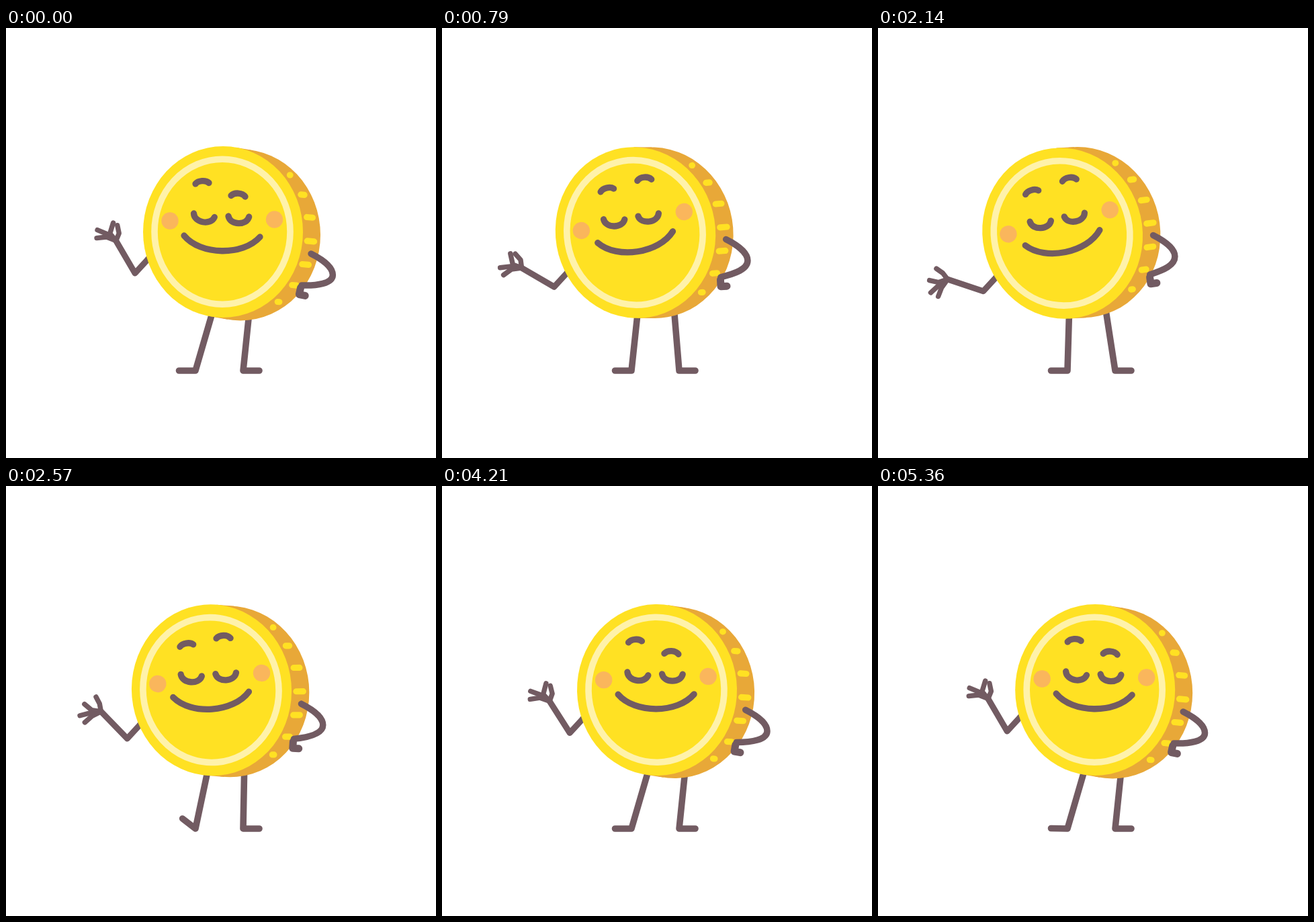
These frames come from a looping animation (640 by 640 pixels, 5430 ms). An HTML page with a canvas:

```html
<!DOCTYPE html>
<html lang="en">
<head>
<meta charset="utf-8">
<title>Coin character</title>
<style>
  html, body { margin: 0; width: 100%; height: 100%; overflow: hidden; background: #fff; }
  canvas { display: block; width: 100%; height: 100%; }
</style>
</head>
<body>
<canvas id="stage" width="640" height="640"></canvas>
<script>
const ctx = document.getElementById('stage').getContext('2d');
const LOOP = 5430, STEP = 1000 / 14;
const INK = '#725b62', GOLD = '#ffe123', RIM = '#e8a838', RING = '#fff2aa', BLUSH = '#fab65c';
const RX = 119, RY = 127.5, RAD = Math.PI / 180;

// Key points of the sway: time, centre x of the coin
const SWAY = [
  [0, 323], [570, 314.5], [790, 288], [1720, 270], [2290, 278],
  [2570, 306], [2860, 313.5], [3290, 318], [4210, 320], [LOOP, 323.2]
];

// Fingers: angle pinched, angle spread, length, bend when pinched
const FINGERS = [[-85, -95, 23, 17], [-99, -142, 27, -31], [-150, -177, 32, 7], [-172, -200, 29, 14]];

const mix = (a, b, t) => a + (b - a) * t;
const polar = (r, deg) => [r * Math.cos(deg * RAD), r * Math.sin(deg * RAD)];
const ramp = (t, a, b) => {
  const u = Math.min(1, Math.max(0, (t - a) / (b - a)));
  return u * u * (3 - 2 * u);
};
const pulse = (t, start, span) =>
  t > start && t < start + span ? Math.sin(Math.PI * (t - start) / span) ** 2 : 0;

// Monotone cubic through the sway points
const slope = i => (SWAY[i + 1][1] - SWAY[i][1]) / (SWAY[i + 1][0] - SWAY[i][0]);
function tangent(i) {
  if (i === 0 || i === SWAY.length - 1) return 0;
  const a = slope(i - 1), b = slope(i);
  return a * b <= 0 ? 0 : 2 * a * b / (a + b);
}
function swayAt(t) {
  let i = 0;
  while (i < SWAY.length - 2 && t >= SWAY[i + 1][0]) i++;
  const [t0, x0] = SWAY[i], [t1, x1] = SWAY[i + 1];
  const h = t1 - t0, u = (t - t0) / h, v = 1 - u;
  return x0 * (1 + 2 * u) * v * v + x1 * u * u * (3 - 2 * u)
    + h * u * v * (tangent(i) * v - tangent(i + 1) * u);
}

// lean runs from 0 (upright) to about 1 (far left); turn eases in faster
function poseAt(t) {
  const x = swayAt(t), lean = Math.max(0, (323 - x) / 48), turn = lean ** 0.85;
  return { t, x, y: 303.5 + 2 * lean * lean, lean, turn, tilt: -12.6 * turn };
}

function ellipse(x, y, rx, ry, color) {
  ctx.beginPath();
  ctx.ellipse(x, y, rx, ry, 0, 0, 7);
  ctx.fillStyle = color;
  ctx.fill();
}

function stroke(width, color = INK) {
  ctx.lineWidth = width;
  ctx.strokeStyle = color;
  ctx.stroke();
}

function line(points, width, color) {
  ctx.beginPath();
  points.forEach(p => ctx.lineTo(p[0], p[1]));
  stroke(width, color);
}

// Arc sagging by depth from the chord a-b
function bow(ax, ay, bx, by, depth, inset) {
  const dx = bx - ax, dy = by - ay, len = Math.hypot(dx, dy);
  const nx = -dy / len * depth, ny = dx / len * depth;
  ctx.beginPath();
  ctx.moveTo(ax, ay);
  ctx.bezierCurveTo(ax + dx * inset + nx, ay + dy * inset + ny,
    bx - dx * inset + nx, by - dy * inset + ny, bx, by);
  stroke(9.3);
}

function turned(x, y, deg, draw) {
  ctx.save();
  ctx.translate(x, y);
  ctx.rotate(deg * RAD);
  draw();
  ctx.restore();
}

function drawLeg(hipX, hipY, ankle, toe) {
  line([[mix(ankle, hipX, 1.15), mix(510, hipY, 1.15)], [ankle, 510], toe], 9.6);
}

function drawLegs({ t, lean }) {
  const lift = 38 * (pulse(t, 2210, 760) + pulse(t, 3095, 760) + pulse(t, 4640, 760));
  const [tx, ty] = polar(24.5, 180 + lift);
  drawLeg(Math.min(305, 306.5 - 22 * lean), 431, 282, [282 + tx, 510 + ty]);
  drawLeg(Math.min(361, 362.5 - 22.5 * lean), 433 - 8 * lean, 353, [377, 510]);
}

function drawWavingArm({ t, x, lean, turn }) {
  const ex = x - 131 + 13 * turn, ey = 365 + 26.5 * turn;
  const swing = -41 * lean ** 1.05;
  const [wx, wy] = polar(56, swing - 120.3);
  line([[ex + 35, ey - 39], [ex + 17.5, ey - 19], [ex, ey], [ex + wx, ey + wy]], 9);
  const open = ramp(t, 1140, 1420) * (1 - ramp(t, 2640, 2930));
  turned(ex + wx, ey + wy, swing, () => {
    for (const [pinch, spread, length, bend] of FINGERS) {
      const angle = mix(pinch, spread, open);
      const knuckle = polar(length * 0.52, angle + bend * (1 - open * 0.5));
      line([[0, 0], knuckle, polar(length, angle)], 7.4);
    }
  });
}

function drawCoin() {
  const bx = 26, by = 4.5, a = Math.atan2(by / RY, bx / RX);
  const sx = RX * Math.sin(a), sy = RY * Math.cos(a);
  ellipse(bx, by, RX, RY, RIM);
  ctx.beginPath();
  ctx.moveTo(sx, -sy);
  ctx.lineTo(bx + sx, by - sy);
  ctx.lineTo(bx - sx, by + sy);
  ctx.lineTo(-sx, sy);
  ctx.fill();

  for (let i = -3; i <= 3; i++) {
    const d = (5.6 + i * 16.1) * RAD;
    const half = Math.max(0.01, 5.2 * Math.cos((i - 0.2) * 27 * RAD));
    turned(13 + 118 * Math.cos(d), 1.5 + 127 * Math.sin(d), 5,
      () => line([[-half, 0], [half, 0]], 9.2, GOLD));
  }

  ellipse(0, 0, RX, RY, GOLD);
  ctx.beginPath();
  ctx.ellipse(-1, -0.3, 101, 108, 0, 0, 7);
  stroke(9.6, RING);
}

function drawFace({ t, tilt }) {
  const raise = ramp(t, 500, 770) * (1 - ramp(t, 2600, 2900));
  const [rx, ry] = polar(22 * raise, -90 - tilt);
  const drop = 3 * raise;
  ellipse(-79, -16.5, 12.7, 12.7, BLUSH);
  ellipse(76.5, -18.5, 12.7, 12.7, BLUSH);
  bow(-41, -71.5 + drop, -21, -73 + drop, -4.8, 0.22);
  bow(12 + rx, -54 + ry, 33 + rx, -52.5 + ry, -5.6, 0.22);
  bow(-43.5, -27.5, -12.7, -22, 13.5, 0.1);
  bow(8, -23.5, 38.7, -22.5, 13.5, 0.1);
  bow(-58, 5.5, 55, 7.5, 29, 0.22);
}

function drawHipArm({ x, y, turn, tilt }) {
  const [dx, dy] = polar(135, 13.9 + tilt);
  const sx = x + dx, sy = y + dy, ex = sx + 32.3, ey = sy + 31.5;
  const fx = x + 117 + 13 * turn, fy = 383 - 16 * turn, fist = 15 - 20 * turn;
  const [cx, cy] = polar(22.5, fist - 13);
  ctx.beginPath();
  ctx.moveTo(sx, sy);
  ctx.bezierCurveTo(sx + 16, sy + 8, ex, ey - 12, ex, ey);
  ctx.bezierCurveTo(ex, ey + 13, fx + cx, fy + cy, fx, fy);
  stroke(9.5);
  turned(fx, fy, fist, () => {
    line([[-0.5, 4], [0, 14], [9, 13.5]], 11);
    ctx.fillStyle = INK;
    ctx.fill();
  });
}

function draw(now) {
  const k = Math.floor((now % LOOP + 5) / STEP) % 76;
  const pose = poseAt(10 * Math.round(k * STEP / 10));
  ctx.fillStyle = '#fff';
  ctx.fillRect(0, 0, 640, 640);
  ctx.lineCap = ctx.lineJoin = 'round';
  drawLegs(pose);
  drawWavingArm(pose);
  turned(pose.x, pose.y, pose.tilt, () => {
    drawCoin();
    drawFace(pose);
  });
  drawHipArm(pose);
}

const start = performance.now();
function tick() {
  draw(performance.now() - start);
  requestAnimationFrame(tick);
}
tick();
</script>
</body>
</html>
```
